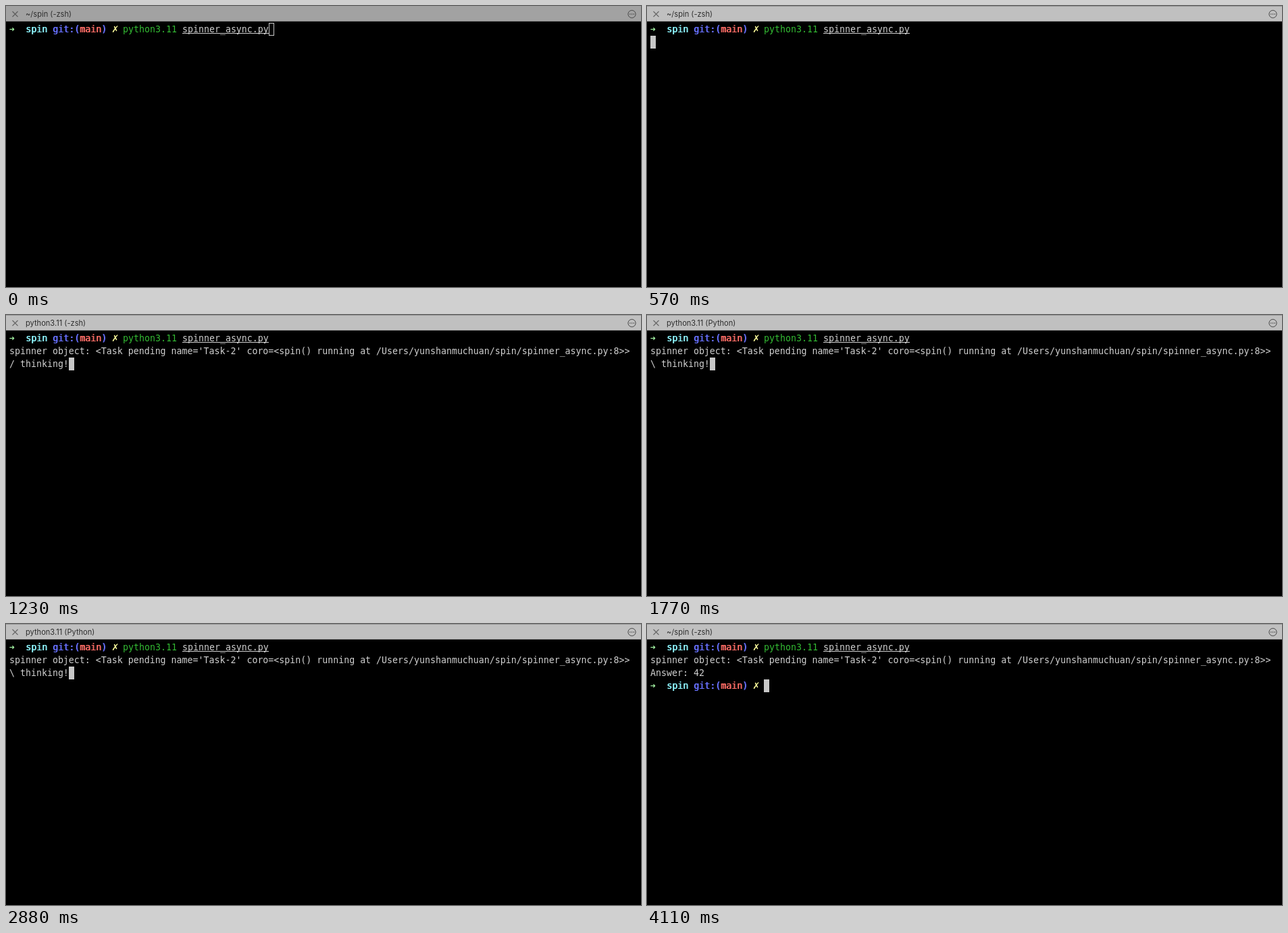
These frames come from a looping animation (940 by 416 pixels, 4.2 s). An HTML page with a canvas:

```html
<!DOCTYPE html>
<html lang="en">
<head>
<meta charset="utf-8">
<title>Terminal spinner</title>
<style>
  html, body { margin: 0; width: 100%; height: 100%; overflow: hidden; background: #000; }
  canvas { display: block; }
</style>
</head>
<body>
<canvas id="term" width="940" height="416"></canvas>
<script>
const ctx = document.getElementById('term').getContext('2d');
const LOOP = 4200;
const CELL = 8, ROW = 19, LEFT = 5, TOP = 25;
const MONO = '13.288px "DejaVu Sans Mono", monospace';
const SYMBOL = 'bold 13.288px "DejaVu Sans", sans-serif';
const UI = '11.1px Inter, sans-serif';
const C = {
  fg: '#d0d0d0', cursor: '#c7c7c7', green: '#33bb33', lime: '#a5f5a5', cyan: '#8ff6ff',
  blue: '#6871ff', red: '#ff6e67', yellow: '#ffff9c', mark: '#8fc8f5'
};
const TASK = "spinner object: <Task pending name='Task-2' coro=<spin() running at " +
  "/Users/yunshanmuchuan/spin/spinner_async.py:8>>";

// Moments of the session, in ms
const T = { focus: 90, enter: 570, title: 630, spin: 690, job: 1380,
            answer: 3360, done: 3420, prompt: 3480, shell: 4110 };

const colX = col => LEFT + col * CELL;
const rowY = row => TOP + row * ROW;

function put(col, row, text, color = C.fg, font = MONO) {
  ctx.font = font;
  ctx.fillStyle = color;
  ctx.fillText(text, colX(col), rowY(row) + 14);
}

// Bold by double strike, as terminals do for faces without a bold cut
function putBold(col, row, text, color) {
  put(col, row, text, color);
  put(col + 0.1, row, text, color);
}

function prompt(row) {
  put(0, row, '➜', C.lime, 'bold ' + MONO);
  putBold(3, row, 'spin', C.cyan);
  putBold(8, row, 'git:(', C.blue);
  putBold(13, row, 'main', C.red);
  putBold(17, row, ')', C.blue);
  put(18.9, row, '✗', C.yellow, SYMBOL);
}

function command() {
  prompt(0);
  put(21, 0, 'python3.11', C.green);
  put(32, 0, 'spinner_async.py');
  ctx.fillRect(colX(32), 40, 16 * CELL, 1);
}

function cursor(col, row, filled = true) {
  const x = colX(col), y = rowY(row);
  ctx.fillStyle = ctx.strokeStyle = C.cursor;
  ctx.lineWidth = 1;
  if (filled) ctx.fillRect(x, y, CELL, ROW);
  else ctx.strokeRect(x + 0.5, y + 0.5, CELL - 1, ROW - 1);
}

function titleBar(text, active) {
  ctx.fillStyle = active ? '#c0c0c0' : '#a2a2a2';
  ctx.fillRect(0, 0, 940, 23);
  ctx.fillStyle = 'rgba(0, 0, 0, 0.2)';
  ctx.fillRect(0, 22, 940, 1);
  if (active) ctx.fillRect(0, 0, 940, 1);

  ctx.strokeStyle = active ? '#666' : '#5c5c5c';
  ctx.lineWidth = 1.1;
  ctx.beginPath();
  ctx.moveTo(9.5, 8); ctx.lineTo(17.5, 16);
  ctx.moveTo(17.5, 8); ctx.lineTo(9.5, 16);
  ctx.stroke();

  ctx.font = UI;
  ctx.fillStyle = '#2e2e2e';
  ctx.fillText(text, 29, 16);

  ctx.strokeStyle = ctx.fillStyle = '#484848';
  ctx.lineWidth = 1;
  ctx.beginPath();
  ctx.arc(926.5, 12, 5.6, 0, 2 * Math.PI);
  ctx.stroke();
  for (const dx of [-2.7, 0, 2.7]) {
    ctx.beginPath();
    ctx.arc(926.5 + dx, 12, 0.8, 0, 2 * Math.PI);
    ctx.fill();
  }
}

function titleAt(t) {
  const name = t >= T.title && t < T.done ? 'python3.11' : '~/spin';
  const job = t >= T.job && t < T.shell ? 'Python' : '-zsh';
  return `${name} (${job})`;
}

// The spinner advances every 90 ms, with one 30 ms lag after 1950
function spinnerAt(t) {
  const lag = t < 1950 ? 0 : Math.min(30, t - 1950);
  return '\\|/-'[Math.floor((t - T.spin - lag) / 90) % 4];
}

function draw(t) {
  ctx.fillStyle = '#000';
  ctx.fillRect(0, 0, 940, 416);
  titleBar(titleAt(t), t >= T.focus);
  command();

  if (t < T.enter) return cursor(48, 0, t >= T.focus);
  if (t < T.spin) return cursor(0, 1);

  put(0, 1, TASK);
  if (t < T.answer) {
    put(0, 2, spinnerAt(t) + ' thinking!');
    return cursor(11, 2);
  }

  put(0, 2, 'Answer: 42');
  if (t >= T.prompt) {
    prompt(3);
    return cursor(21, 3);
  }
  cursor(0, 3);
  if (t >= T.done) {
    ctx.fillStyle = C.mark;
    ctx.beginPath();
    ctx.moveTo(0, 86); ctx.lineTo(5, 91.5); ctx.lineTo(0, 97);
    ctx.fill();
  }
}

const start = performance.now();
function tick() {
  draw((performance.now() - start) % LOOP);
  requestAnimationFrame(tick);
}
tick();
</script>
</body>
</html>
```
